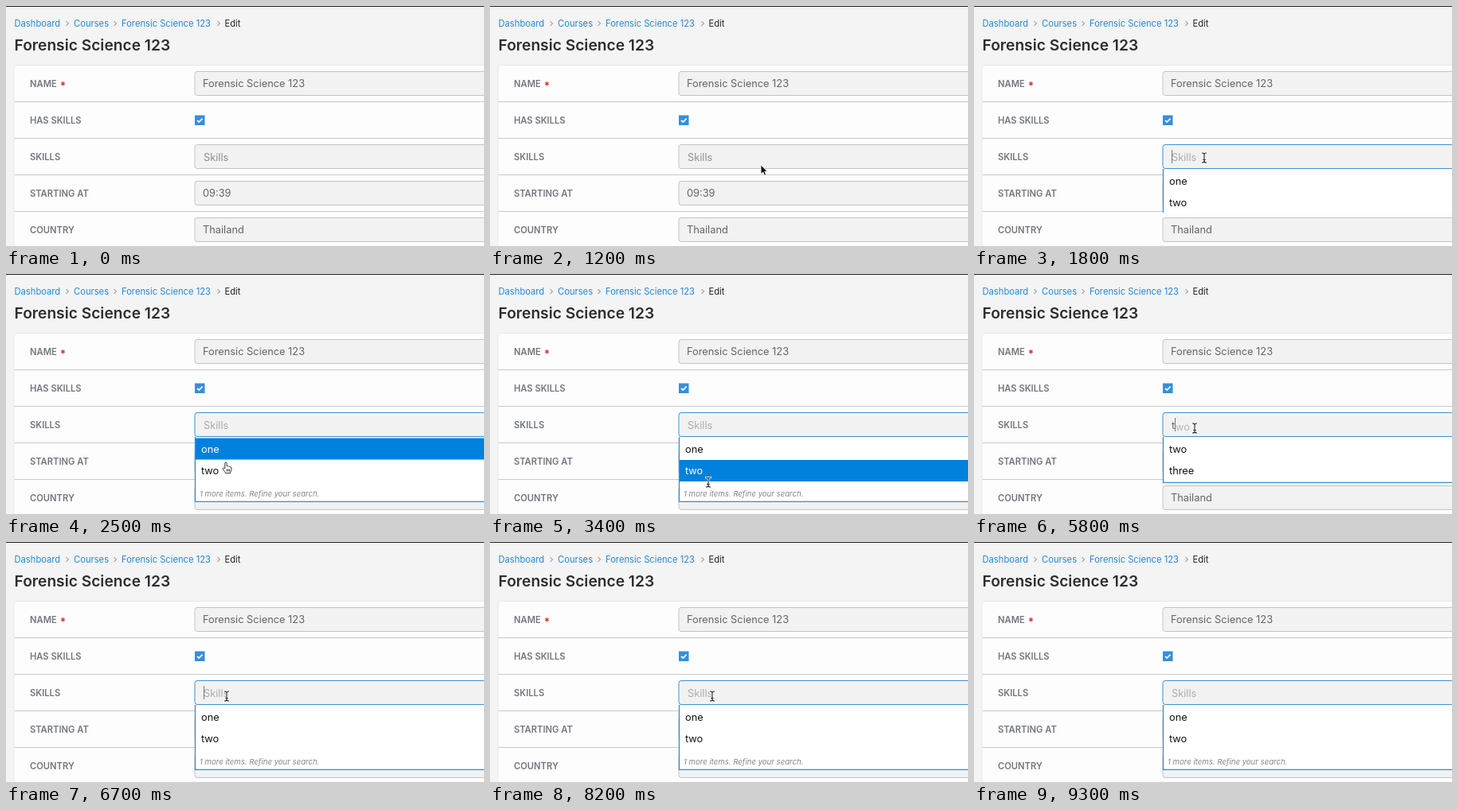
Animation, 600 px wide and 302 px high, one loop 9.7 s. Source, as an HTML page:

```html
<!DOCTYPE html>
<html lang="en">
<head>
<meta charset="utf-8">
<title>Edit course</title>
<style>
  html, body { margin: 0; height: 100%; overflow: hidden; background: #f4f4f4; }
  svg { display: block; width: 100vw; height: 100vh; font: 12.8px Inter, sans-serif; }
  .crumb { font-size: 11.2px; fill: #2488d3; }
  .title { font-size: 19.2px; font-weight: 600; fill: #2c2d31; }
  .label { font-size: 11.2px; font-weight: 600; fill: #72767f; }
  .value { fill: #646464; }
  .option { fill: #111; }
  .footer { font-size: 9.6px; font-style: italic; fill: #858585; }
</style>
</head>
<body>
<svg viewBox="0 0 600 302" id="stage">
  <defs>
    <path id="arrow" d="M0 0V11.5L2.7 9L4.6 13.2L6.6 12.3L4.8 8.2H8Z" fill="#111" stroke="#fff" stroke-width=".8"/>
    <g id="ibeam" fill="none" stroke-linecap="square">
      <path d="M-2.5-6Q0-6 0-4Q0-6 2.5-6M0-4V4M-2.5 6Q0 6 0 4Q0 6 2.5 6M-1.2 2.5H1.2" stroke="#fff" stroke-width="2.6"/>
      <path d="M-2.5-6Q0-6 0-4Q0-6 2.5-6M0-4V4M-2.5 6Q0 6 0 4Q0 6 2.5 6M-1.2 2.5H1.2" stroke="#222" stroke-width="1.1"/>
    </g>
    <path id="hand" d="M-1.2 8V1.2Q-1.2 0 0 0T1.2 1.2V4.8Q2.5 4 3.4 5.3Q4.7 4.7 5.3 6Q6.9 5.6 6.9 7.3V9.5Q6.8 11 5.8 12.2V13.6H-.4Q-.8 12-3.4 9Q-4.4 7.4-3.3 6.9Q-2.3 6.6-1.2 8ZM1.3 8.5V11.5M3 8.5V11.5M4.7 8.5V11.5" fill="#fff" stroke="#222" stroke-width=".9" stroke-linejoin="round"/>
    <clipPath id="listClip"><rect id="listBounds" x="230" y="205" width="370"/></clipPath>
  </defs>

  <rect width="600" height="302" fill="#f4f4f4"/>
  <rect width="600" height="1" fill="#222"/>
  <g class="crumb">
    <text x="10.5" y="26">Dashboard</text>
    <text x="85" y="26">Courses</text>
    <text x="145" y="26">Forensic Science 123</text>
    <text x="274.5" y="26" fill="#222">Edit</text>
  </g>
  <path d="M75.5 19l3 3-3 3M135.5 19l3 3-3 3M265.500 19l3 3-3 3" fill="none" stroke="#777"/>
  <text class="title" x="10.500" y="56">Forensic Science 123</text>

  <rect x="10" y="74.500" width="600" height="240" rx="4" fill="#fdfdfd" stroke="#e9e9e9"/>
  <g id="rows"></g>
  <rect x="237" y="137.500" width="12.500" height="12.500" fill="#3490dc"/>
  <path d="M240 143.800l2.300 2.300 4.300-4.500" fill="none" stroke="#fff" stroke-width="1.700"/>

  <text id="hint" class="value" x="248" y="194.500">Skills</text>
  <g id="typed">
    <text class="value" x="248" y="194.500">t</text>
    <text x="253" y="197" fill="#b5b5b5">wo</text>
  </g>
  <rect id="caret" y="181" width="1" height="17" fill="#777"/>
  <g id="list" clip-path="url(#listClip)">
    <path id="panel" fill="#fff" stroke="#3e92d2" stroke-width="1.400"/>
    <rect id="highlight" x="238" width="362" height="27" fill="#0081dd"/>
    <text id="first" class="option" x="245" y="224.500"></text>
    <text id="second" class="option" x="245" y="252"></text>
    <text id="footer" class="footer" x="243" y="279.500">1 more items. Refine your search.</text>
  </g>
  <use id="cursor"/>
</svg>
<script>
const LOOP = 9700, STEP = 100;
const $ = id => document.getElementById(id);
const set = (id, attrs) => { for (const k in attrs) $(id).setAttribute(k, attrs[k]); };
const show = (id, on) => { $(id).style.display = on ? '' : 'none'; };

const fields = [['NAME', 'Forensic Science 123'], ['HAS SKILLS'], ['SKILLS', ''],
  ['STARTING AT', '09:39'], ['COUNTRY', 'Thailand']];
$('rows').innerHTML = fields.map(([label, value], i) => {
  const y = 97.5 + 46 * i;
  const box = value === undefined ? '' :
    `<rect id="input${i}" x="237" y="${y - 15}" width="380" height="30" rx="3" fill="#f2f2f2" stroke="#c4c4c4"/>
     <text class="value" x="247" y="${y + 4.7}">${value}</text>`;
  const star = i ? '' : '<tspan dx="4" fill="#d9232e">*</tspan>';
  return `<text class="label" x="30" y="${y + 4.5}">${label}${star}</text>${box}
    <path d="M10.5 ${y + 23}H600" stroke="#c9c9c9"/>`;
}).join('');

// Pointer stops: time, x, y, shape; eased between stops that share a leg.
const path = [
  [600, 155, 233, 'arrow'], [700],
  [900, 300, 192, 'arrow'], [1000, 322, 197, 'arrow'], [1100, 336, 200, 'arrow'], [1200, 340, 200, 'arrow'],
  [1400, 312, 192, 'arrow'], [1500, 289, 191, 'ibeam'],
  [2200, 284, 197, 'ibeam'], [2300, 280, 209, 'hand'], [2400, 278, 223, 'hand'], [2500, 276, 237, 'hand'],
  [2600, 275, 249, 'hand'], [2700, 274, 258, 'hand'], [2800, 274, 266, 'ibeam'], [3000, 274, 275, 'ibeam'],
  [3400, 274, 262, 'ibeam'], [3500, 275, 242, 'hand'], [3600, 276, 222, 'hand'],
  [3700, 276, 205, 'ibeam'], [3800, 277, 197, 'ibeam'], [3900, 277, 194, 'ibeam'],
  [8200, 279, 194, 'ibeam'], [8300, 450, 194, 'ibeam'], [8400]
];
const within = (t, ...spans) => spans.some(([a, b]) => t >= a && t < b);

function draw(t) {
  const focused = t >= 1700, typing = within(t, [4500, 6500]), filtered = within(t, [4600, 6600]);
  set('input2', { stroke: focused ? '#3e92d2' : '#c4c4c4' });
  set('hint', { opacity: focused ? .5 : .7 });
  show('hint', !typing);
  show('typed', typing);

  set('caret', { x: typing ? 252 : 248 });
  show('caret', within(t, [1700, 2200], [4500, 5200], [5800, 6400], [6500, 7000], [7600, 8200], [8800, 9300]));

  show('list', focused);
  const bottom = filtered ? 262.5 : 286.5;
  const open = Math.min(1, (t - 1700 + STEP) / 300);
  set('panel', { d: `M237.500 204V${bottom}H602V204` });
  set('listBounds', { height: Math.max(0, (bottom + 1 - 205) * open) });
  $('first').textContent = filtered ? 'two' : 'one';
  $('second').textContent = filtered ? 'three' : 'two';
  show('footer', !filtered);

  const onOne = within(t, [2300, 2600], [3600, 3700]), onTwo = within(t, [2600, 3600]);
  show('highlight', onOne || onTwo);
  set('highlight', { y: onOne ? 206.5 : 234 });
  $('first').style.fill = onOne ? '#fff' : '';
  $('second').style.fill = onTwo ? '#fff' : '';

  const [, x, y, shape] = path.findLast(stop => stop[0] <= t) || [];
  show('cursor', shape);
  if (shape) set('cursor', { href: '#' + shape, x, y });
}

function tick(now) {
  draw(Math.floor(now % LOOP / STEP) * STEP);
  requestAnimationFrame(tick);
}
draw(0);
requestAnimationFrame(tick);
</script>
</body>
</html>
```
